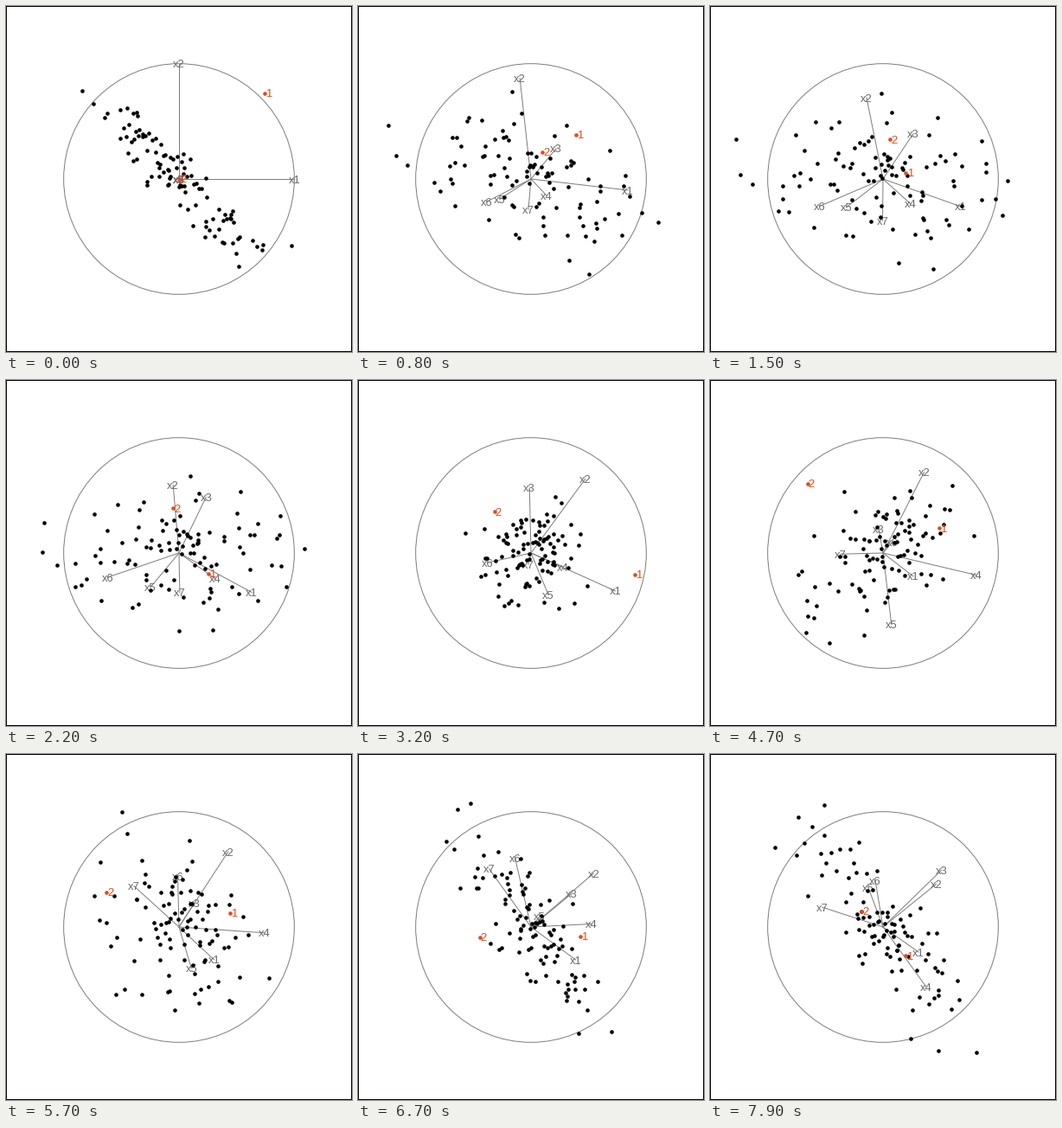
Recreate the animation shown at these times as a matplotlib script. Size 400x400 px, loop 8000 ms.

```python
import numpy as np
import matplotlib.pyplot as plt
from matplotlib.animation import FuncAnimation
from matplotlib.patches import Circle, Rectangle

SIZE, DPI, FRAMES, STEP = 400, 100, 80, 100
MID, R = SIZE / 2, SIZE / 3
GREY, TEXT, ORANGE = "#7f7f7f", "#6a6a6a", "#e34a1a"
PX = 72 / DPI

# The tour starts on x1, x2 and passes these views: frame -> tips of x1..x7 (px, y up)
VIEWS = {
    8: [(112, -13), (-13, 116), (29, 35), (18, -19), (-36, -23), (-51, -26), (-3, -35)],
    22: [(84, -46), (-7, 79), (31, 65), (42, -30), (-33, -40), (-82, -28), (1, -46)],
    32: [(97, -44), (62, 85), (-2, 75), (37, -16), (20, -48), (-50, -11), (-3, -13)],
    47: [(35, -27), (47, 93), (-5, 28), (108, -26), (10, -82), (11, 13), (-49, -1)],
    67: [(52, -38), (72, 61), (47, 38), (70, 3), (10, 12), (-19, 79), (-49, 67)],
    79: [(41, -29), (61, 49), (67, 65), (50, -69), (-17, 45), (-9, 53), (-70, 23)],
}


def orthonormal(a):
    u, _, vt = np.linalg.svd(a, full_matrices=False)
    return u @ vt


TIMES = np.array([0, *VIEWS])
BASES = np.array([np.eye(7, 2), *(orthonormal(np.array(v)) for v in VIEWS.values())])
SLOPES = np.gradient(BASES, TIMES, axis=0)


def basis(t):
    """Projection basis at frame t: a Hermite path kept orthonormal."""
    k = min(np.searchsorted(TIMES, t, side="right") - 1, len(TIMES) - 2)
    h = TIMES[k + 1] - TIMES[k]
    s = (t - TIMES[k]) / h
    a = ((1 + 2 * s) * (1 - s) ** 2 * BASES[k] + s * (1 - s) ** 2 * h * SLOPES[k]
         + s * s * (3 - 2 * s) * BASES[k + 1] - s * s * (1 - s) * h * SLOPES[k + 1])
    return orthonormal(a)


def make_cloud(n=100, sd=48, seed=4):
    """x1, -x2, x3 move together, as do x4, -x5; x6 and x7 follow loosely."""
    z = np.random.default_rng(seed).uniform(-1, 1, (3, n, 9)).sum(axis=0)
    z -= z.mean(axis=0)
    a, b, c, d, *noise = (orthonormal(z) * np.sqrt(n)).T

    def near(v, e):
        return .96 * v + .28 * e

    x6 = .85 * c - .5 * b
    cols = [near(a, noise[0]), near(-a, noise[1]), near(a, noise[2]),
            near(b, noise[3]), near(-b, noise[4]), x6, .6 * x6 + .8 * d]
    return sd * np.column_stack(cols)


CLOUD = make_cloud()
# Two points that break the pattern: one in x1..x3, one in x4, x5
OUTLIERS = 99 * np.array([[1, 1, -1, 0, 0, 0, 0], [0, 0, 0, -1, -1, 0, 0]])


def to_stage(p):
    return MID + p * (1, -1)


fig = plt.figure(figsize=(SIZE / DPI, SIZE / DPI), dpi=DPI, facecolor="white")
ax = fig.add_axes([0, 0, 1, 1])
ax.set(xlim=(0, SIZE), ylim=(SIZE, 0))
ax.axis("off")
ax.add_patch(Rectangle((.5, .5), SIZE - 1, SIZE - 1, fill=False, ec="black",
                       lw=PX, snap=False))
ax.add_patch(Circle((MID, MID), R, fill=False, ec=GREY, lw=PX))


def label(text, color, z):
    return ax.text(MID, MID, text, color=color, ha="center", va="baseline",
                   family="Liberation Sans", size=13 * PX, zorder=z)


def dots(color, z):
    return ax.plot([], [], "o", color=color, ms=4.6 * PX, mew=0, zorder=z,
                   snap=False)[0]


spokes = [ax.plot([], [], color=GREY, lw=PX, zorder=2)[0] for _ in range(7)]
names = [label(f"x{i + 1}", TEXT, 3) for i in range(7)]
cloud = dots("black", 4)
marks = dots(ORANGE, 5)
tags = [label(str(i + 1), ORANGE, 6) for i in range(2)]


def draw(t):
    a = basis(t)
    for line, name, (x, y) in zip(spokes, names, to_stage(a * R)):
        line.set_data([MID, x], [MID, y])
        name.set_position((x, y + 4.6))
    cloud.set_data(*to_stage(CLOUD @ a).T)
    spots = to_stage(OUTLIERS @ a)
    marks.set_data(*spots.T)
    for tag, (x, y) in zip(tags, spots):
        tag.set_position((x + 4.7, y + 4.2))
    return [*spokes, *names, cloud, marks, *tags]


anim = FuncAnimation(fig, draw, frames=FRAMES, interval=STEP, repeat=True,
                     repeat_delay=0, blit=False)
plt.show()
```
